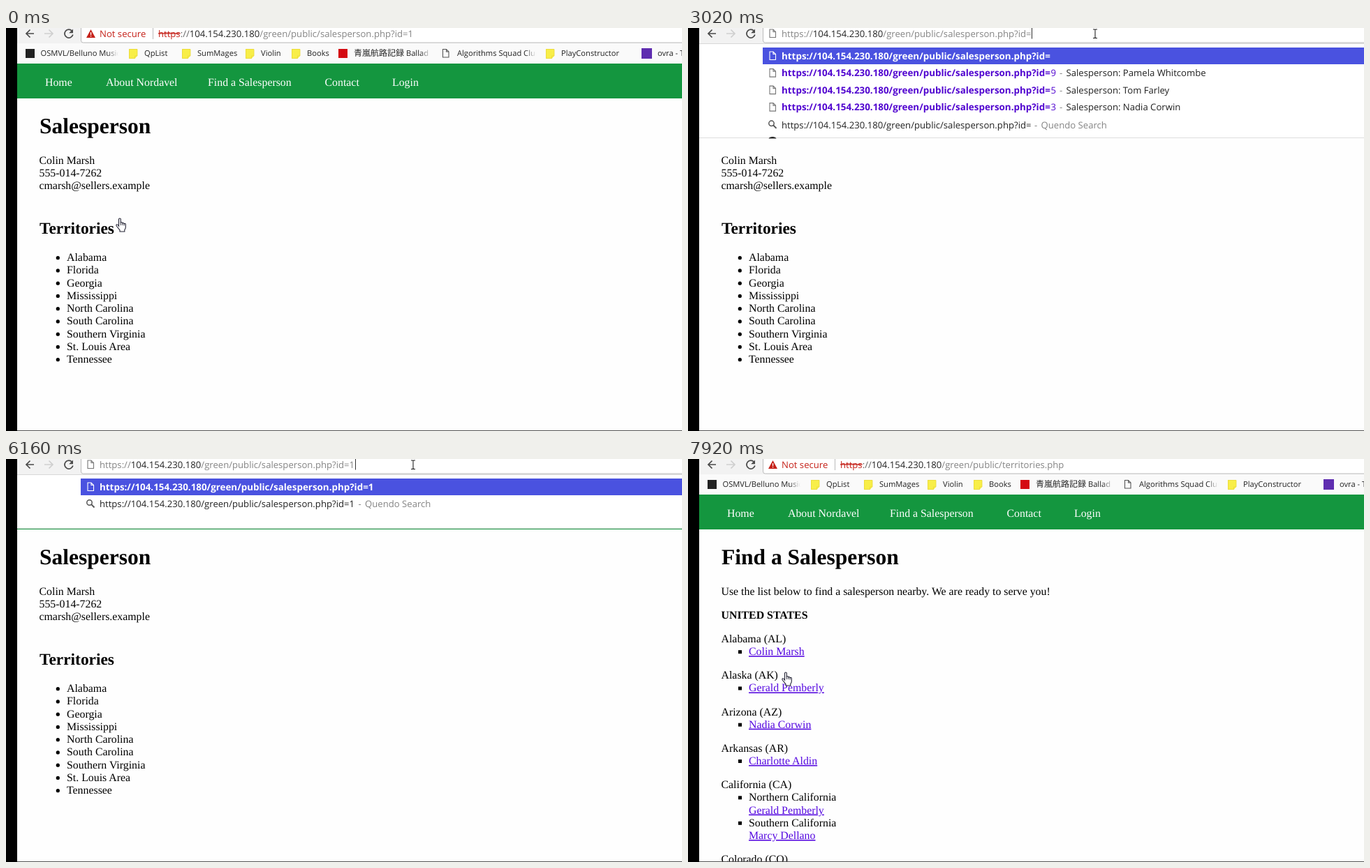
Write an HTML page that moves like this. It is 968x578 px and loops after 8 s.

```html
<!DOCTYPE html>
<html lang="en">
<head>
<meta charset="utf-8">
<title>Salesperson</title>
<style>
  html, body { margin: 0; width: 100%; height: 100%; overflow: hidden; background: #fff; }
  svg { display: block; }
  #stage { width: 968px; height: 578px; }
  text { white-space: pre; text-rendering: geometricPrecision; }
  .page { font: 15.85px "Liberation Serif", "Times New Roman", serif; fill: #000; }
  .ui { font: 13.13px "Open Sans", "Noto Sans", sans-serif; fill: #222; }
  .mark { font: 11.15px "Open Sans", "Noto Sans", sans-serif; fill: #222; }
  .cjk { font: 12px "Noto Sans CJK JP", "Noto Sans CJK", sans-serif; }
  .h1 { font-size: 31.5px; font-weight: 700; }
  .h2 { font-size: 23.4px; font-weight: 700; }
  .b { font-weight: 700; }
  .strong { font-size: 13.4px; font-weight: 700; }
  .link { fill: #5508e0; text-decoration: underline; }
  .white { fill: #fff; }
  .grey { fill: #858585; }
  .purple { fill: #5206d0; }
  .red { fill: #c5221a; }
</style>
</head>
<body>
<svg id="stage" viewBox="0 0 968 578"></svg>
<script>
const LOOP = 8000;
const BLUE = '#4a52e0', GREY = '#858585', BAR = '#fafafa';
const HOST = '104.154.230.180', SALES = '/green/public/salesperson.php?id=',
      AREAS = '/green/public/territories.php';
const PERSON = 'Colin Marsh';

const text = (x, y, s, cls = 'page', extra = '') =>
  `<text x="${x}" y="${y}" class="${cls}" ${extra}>${s}</text>`;
const rect = (x, y, w, h, fill, extra = '') =>
  `<rect x="${x}" y="${y}" width="${w}" height="${h}" fill="${fill}" ${extra}/>`;
const span = (s, fill, extra = '') => `<tspan fill="${fill}" ${extra}>${s}</tspan>`;
const line = (d, color, w = 1.5) =>
  `<path d="${d}" fill="none" stroke="${color}" stroke-width="${w}"/>`;
const group = (id, body) => `<g id="${id}">${body}</g>`;
const sheet = (x, y, color) =>
  line(`M${x + .5} ${y + .5}h5l3.5 3.5v8h-8.5zM${x + 5.5} ${y + .5}v3.5h3.5`, color, 1.1);
const lens = y =>
  `<circle cx="119.5" cy="${y - 2}" r="3.7" fill="none" stroke="#555" stroke-width="1.5"/>` +
  line(`M122.2 ${y + .7}l4.3 4.3`, '#555', 1.9);

// --- web page ---
const nav = [[56, 'Home'], [143, 'About Nordavel'], [289, 'Find a Salesperson'], [456.5, 'Contact'], [553, 'Login']];
const header = rect(16, 51, 952, 50, '#14963f') +
  nav.map(([x, s]) => text(x, 82.5, s, 'page white')).join('');

const areas = ['Alabama', 'Florida', 'Georgia', 'Mississippi', 'North Carolina',
  'South Carolina', 'Southern Virginia', 'St. Louis Area', 'Tennessee'];
const profile =
  text(48, 151, 'Salesperson', 'page h1') +
  [PERSON, '555-014-7262', 'cmarsh@sellers.example'].map((s, i) => text(47.5, 195 + i * 18.2, s)).join('') +
  text(48, 294.7, 'Territories', 'page h2') +
  areas.map((s, i) => {
    const y = 334 + i * 18.25;
    return `<circle cx="74.3" cy="${y - 4.3}" r="2.6"/>` + text(87, y, s);
  }).join('');

const square = y => rect(72, y - 7, 5, 5, '#000');
const seller = (y, s) => text(87, y, s, 'page link');
const states = [['Alabama (AL)', PERSON], ['Alaska (AK)', 'Gerald Pemberly'],
  ['Arizona (AZ)', 'Nadia Corwin'], ['Arkansas (AR)', 'Charlotte Aldin']];
const finder =
  text(48, 151, 'Find a Salesperson', 'page h1') +
  text(47.5, 195, 'Use the list below to find a salesperson nearby. We are ready to serve you!') +
  text(47.5, 229, 'UNITED STATES', 'page b') +
  states.map(([s, who], i) => {
    const y = 263 + i * 52.25;
    return text(47.5, y, s) + square(y + 18.2) + seller(y + 18.2, who);
  }).join('') +
  text(47.5, 472, 'California (CA)') +
  square(490.3) + text(87, 490.3, 'Northern California') + seller(508.6, 'Gerald Pemberly') +
  square(526.8) + text(87, 526.8, 'Southern California') + seller(545, 'Marcy Dellano') +
  text(47.5, 579, 'Colorado (CO)');

// --- bookmarks ---
const mark = (x, s, end) => end
  ? `<svg x="${x}" y="26" width="${end - x}" height="22">${text(0, 14, s, 'mark')}` +
    rect(end - x - 16, 0, 16, 22, 'url(#fade)') + '</svg>'
  : text(x, 40, s, 'mark');
const folder = x => `<path d="M${x} 30h12v10l-3.5 4h-8.5z" fill="#f8ee48"/>` +
  line(`M${x + .5} 30.5h11.5v9.5h-3.5v3.5h-8z`, '#e9d93a', .8);
const bookmarks = rect(16, 22, 952, 29, BAR) +
  rect(28, 30, 13, 13, '#222') + mark(49.5, 'OSMVL/Belluno Music', 161) +
  [[176, 'QpList'], [252, 'SumMages'], [343, 'Violin'], [409, 'Books'], [773, 'PlayConstructor']]
    .map(([x, s]) => folder(x) + mark(x + 22, s)).join('') +
  rect(476, 30, 13, 13, '#d40a12') + mark(498, '<tspan class="cjk">青嵐航路記録</tspan> Ballad', 609) +
  sheet(625, 30, '#555') + mark(646, 'Algorithms Squad Club', 759) +
  rect(910, 29, 15, 15, '#5f2db0') + mark(933, 'ovra - Tracks');

// --- toolbar ---
const toolbar = rect(16, 0, 952, 22, '#f2f2f2') +
  '<path d="M107.5 -5V18q0 3 3 3H970V-5z" fill="#fff" stroke="#bbb"/>' +
  line('M40 8H29M34.5 2.5L29 8l5.5 5.5', '#4a4a4a', 1.7) +
  line('M55 8h12M61.5 2.5L67 8l-5.5 5.5', '#cfcfcf', 1.7) +
  group('reload', line('M94.5 4.2A6 6 0 1 0 95.8 9.5', '#4a4a4a', 1.7) +
    '<path d="M96 1.5v5.8h-5.8z" fill="#4a4a4a"/>') +
  group('stop', line('M84.5 2.5l11 11M95.5 2.5l-11 11', '#4a4a4a', 1.7)) +
  group('plain', sheet(116.5, 1.5, '#777')) +
  group('warn', '<path d="M121.5 2l6.5 12h-13z" fill="#c5221a"/>' + rect(120.9, 6, 1.3, 4, '#fff') +
    rect(120.9, 11, 1.3, 1.3, '#fff') + text(134, 12.5, '', 'ui red', 'id="chip"') +
    rect(0, 0, 1, 16, '#bbb', 'id="split"')) +
  text(0, 12.5, '', 'ui', 'id="url"') +
  group('sel', rect(0, 0, 0, 16, BLUE, 'id="selBox"') +
    `<g clip-path="url(#selClip)">${text(218, 12.5, 'https://' + HOST + SALES + 1, 'ui white')}</g>`) +
  rect(0, 0, 1, 15.5, '#333', 'id="caret"');

// --- suggestion lists ---
const full = 'https://' + HOST + SALES;
const pick = (y, id, note) => rect(107, y - 12, 861, 24, BLUE) + sheet(116.5, y - 6.5, '#fff') +
  text(134, y + 4.8, full + id, 'ui strong white') +
  (note ? text(541, y + 4.8, '-', 'ui white') + text(550.5, y + 4.8, note, 'ui white') : '');
const past = (y, id, note) => sheet(116.5, y - 6.5, '#777') +
  text(134, y + 4.8, full, 'ui strong purple') + text(519.5, y + 4.8, id, 'ui purple') +
  text(532, y + 4.8, '-', 'ui grey') + text(541.5, y + 4.8, note, 'ui');
const search = (y, id, x) => lens(y) + text(134, y + 4.8, full + id, 'ui') +
  text(x, y + 4.8, '-', 'ui grey') + text(x + 9.5, y + 4.8, 'Quendo Search', 'ui grey');

const people = [['9', 'Pamela Whitcombe'], ['5', 'Tom Farley'], ['3', 'Nadia Corwin']];
const lists =
  group('panel', rect(16, 22, 952, 0, '#fff', 'id="panelBox"') + rect(16, 22, 952, 1, '#d8d8d8') +
    rect(16, 0, 952, 1, '#dedede', 'id="panelEnd"')) +
  group('long', pick(40, '') +
    people.map(([id, who], i) => past(64.6 + i * 24.5, id, 'Salesperson: ' + who)).join('') +
    search(138.8, '', 496) + '<path d="M115.5 158.5q1-2.5 5.5-2.5t5.500 2.5z" fill="#222"/>') +
  group('one', pick(40, '1') + search(64.5, '1', 504.5)) +
  group('ten', pick(39.5, '10', 'Find a Salesperson') + search(64, '10', 512.5));

// --- pointers, origin at hot spot ---
const pointers =
  group('beam', line('M-3 -6h2.2l.8 .7l.8 -.7h2.2M0 -5.5v11M-3 6.5h2.2l.8 -.7l.8 .7h2.2', '#222', 1.1)) +
  group('arrow', '<path d="M.5 .5v12.5l3-2.8 2 4.5 2-.9-2-4.3h4z" fill="#fff" stroke="#222"/>') +
  group('hand', '<path d="M-1.5 11V1.5q0-1.5 1.4-1.5t1.4 1.5V6q2-.8 2.5.8 2-.6 2.3.8 2.2-.6 2.2 1.2v4q0 2-1.5 3.7v2.5h-6.8v-2l-4.7-6q-1-1.8.4-2.3 1.3-.2 2.8 2.3z" fill="#fff" stroke="#223" stroke-width="1.1"/>' +
    line('M1.3 6v4M3.8 7v3M6.1 8v2.5', '#223', .9));

document.getElementById('stage').innerHTML =
  `<defs><linearGradient id="fade"><stop stop-color="${BAR}" stop-opacity="0"/><stop offset="1" stop-color="${BAR}"/></linearGradient>
  <clipPath id="selClip"><rect id="selCut" y="0" height="16"/></clipPath></defs>` +
  rect(0, 0, 968, 578, '#fefefe') + header + group('profile', profile) + group('finder', finder) +
  bookmarks + toolbar + lists + rect(16, 577, 952, 1, '#555') + rect(0, 0, 16, 578, '#000') + pointers;

// --- timeline: [ms, ...values], each holds until the next ---
const cursor = [
  [0, 'hand', 163, 273], [150, 'arrow', 310, 140], [270, 'arrow', 414, 29],
  [570, 'beam', 508, 14], [720, 'beam', 590, 9], [840, 'beam', 602, 8], [980, 'beam', 594, 8],
  [1120, 'beam', 578, 8], [1250, 'beam', 560, 8], [1380, 'beam', 545, 8], [1530, 'beam', 570, 8],
  [1680, 'beam', 583, 8], [1960, 'beam', 586, 8], [2080, 'beam', 583, 8],
  [7080, 'arrow', 600, 40], [7230, 'arrow', 517.5, 95], [7380, 'arrow', 470, 136],
  [7500, 'arrow', 430, 168], [7620, 'arrow', 413, 181], [7920, 'hand', 140, 306]];
const selection = [[0, 0], [1120, 576.5], [1250, 557.5], [1380, 542.5], [1530, 568], [1680, 0]];
// the caret blinks with a half-faded step and restarts on each edit
const caret = [[0, 0], [1680, 1], [1960, .5], [2080, 0], [2350, 1], [3150, .5], [3300, 0], [3600, .5], [3730, 1],
  [4050, .5], [4180, 0], [4500, .5], [4630, 1], [4910, .5], [5060, 0], [5370, .5], [5490, 1],
  [5760, .5], [5880, 0], [6010, 1], [6700, 0]];
// chip label, split x, url x, path, caret x, open list, its lower edge
const address = [
  [0, 'Not secure', 210, 218, SALES + 1, 584],
  [2350, '', 0, 134, SALES, 492, 'long', 158],
  [6010, '', 0, 134, SALES + 1, 500, 'one', 130],
  [6150, '', 0, 134, SALES + 1, 500, 'one', 100],
  [6280, '', 0, 134, SALES + 1, 500, 'one', 84],
  [6550, '', 0, 134, SALES + 10, 508, 'ten', 82],
  [6700, '', 0, 134, SALES + 10, 508],
  [7080, 'No...e', 180, 189, AREAS, 0],
  [7230, 'Not ...ure', 204, 213, AREAS, 0],
  [7380, 'Not secure', 210, 218, AREAS, 0]];
const pageIn = 7500, loadFrom = 6700;

const $ = id => document.getElementById(id);
const show = (id, on) => { $(id).style.display = on ? '' : 'none'; };
const set = (id, name, value) => $(id).setAttribute(name, value);
const at = (table, t) => table.findLast(row => row[0] <= t);
let lastAddress;

function setAddress([, chip, split, x, path, caretX, open, edge = 22]) {
  show('warn', chip);
  show('plain', !chip);
  $('chip').textContent = chip;
  set('split', 'x', split);
  const scheme = chip
    ? span('https', '#c5221a', 'text-decoration="line-through"') + span('://', '#666')
    : span('https://', GREY);
  set('url', 'x', x);
  $('url').innerHTML = scheme + span(HOST, '#222') + span(path, GREY);
  show('panel', open);
  set('panelBox', 'height', edge - 22);
  set('panelEnd', 'y', edge - 1);
  for (const id of ['long', 'one', 'ten']) show(id, id === open);
  set('caret', 'x', caretX);
}

function draw(t) {
  const row = at(address, t);
  if (row !== lastAddress) setAddress(lastAddress = row);

  const from = at(selection, t)[1];
  show('sel', from);
  for (const id of ['selBox', 'selCut']) {
    set(id, 'x', from);
    set(id, 'width', from ? 585 - from : 0);
  }
  set('caret', 'opacity', at(caret, t)[1]);

  const loading = t >= loadFrom && t < pageIn;
  show('stop', loading);
  show('reload', !loading);
  show('profile', t < pageIn);
  show('finder', t >= pageIn);

  const [, kind, x, y] = at(cursor, t);
  for (const id of ['beam', 'arrow', 'hand']) show(id, id === kind);
  set(kind, 'transform', `translate(${x} ${y})`);
}

const start = performance.now();
function tick() {
  draw((performance.now() - start) % LOOP);
  requestAnimationFrame(tick);
}
tick();
</script>
</body>
</html>
```
